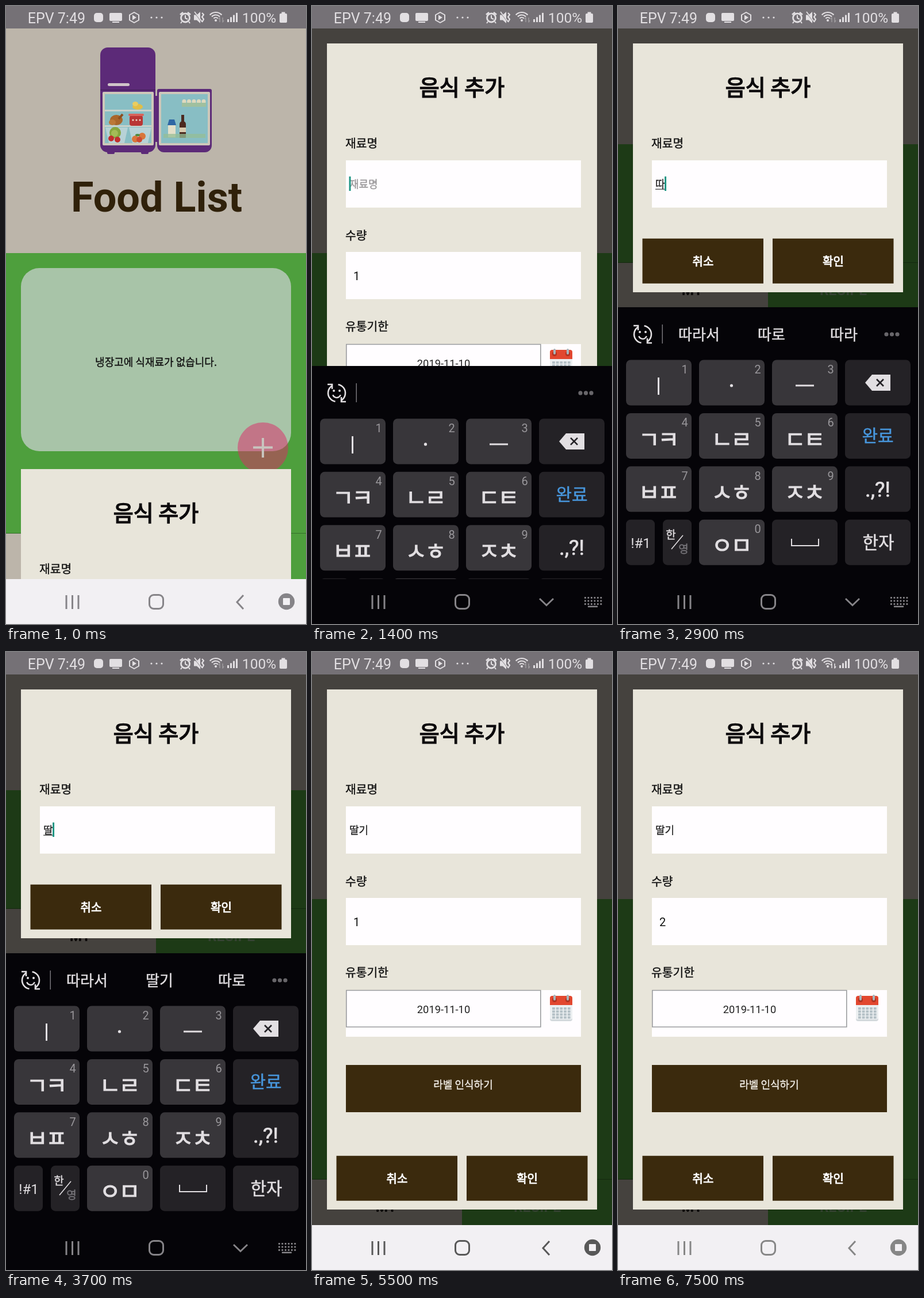
An HTML page with a canvas for the animation above (8000 ms loop, 522 by 1073 pixels).

```html
<!DOCTYPE html>
<html lang="ko">
<head>
<meta charset="utf-8">
<title>Food List</title>
<style>
html, body { margin: 0; width: 522px; height: 1073px; overflow: hidden; background: #757176; }
canvas { display: block; }
</style>
</head>
<body>
<canvas id="stage" width="522" height="1073"></canvas>
<script>
const ctx = document.getElementById('stage').getContext('2d');
const LOOP = 8000, STEP = 100;
const KOREAN = '"Noto Sans CJK KR", "Noto Sans CJK", sans-serif';
const LATIN = 'Roboto, "Noto Sans CJK KR", sans-serif';
const CREAM = '#e8e5da', BROWN = '#3b2a0d', PURPLE = '#5c2a78', ICE = '#88bec4', PALE = '#e2dfe2';
const MEDIUM = 0.042;

// Drawing helpers
function rect(x, y, w, h, color, r = 0) {
  ctx.fillStyle = color;
  ctx.beginPath();
  ctx.roundRect(x, y, w, h, r);
  ctx.fill();
}
function frame(x, y, w, h, color, width, r = 0) {
  ctx.strokeStyle = color;
  ctx.lineWidth = width;
  ctx.beginPath();
  ctx.roundRect(x, y, w, h, r);
  ctx.stroke();
}
function dot(x, y, r, color, ry = r) {
  ctx.fillStyle = color;
  ctx.beginPath();
  ctx.ellipse(x, y, r, ry, 0, 0, 7);
  ctx.fill();
}
function arc(x, y, r, from, to, color, width) {
  ctx.strokeStyle = color;
  ctx.lineWidth = width;
  ctx.beginPath();
  ctx.arc(x, y, r, from, to);
  ctx.stroke();
}
function path(points) {
  ctx.beginPath();
  for (let i = 0; i < points.length; i += 2) ctx.lineTo(points[i], points[i + 1]);
}
function line(points, color, width) {
  path(points);
  ctx.strokeStyle = color;
  ctx.lineWidth = width;
  ctx.stroke();
}
function shape(points, color) {
  path(points);
  ctx.fillStyle = color;
  ctx.fill();
}
// Text centred vertically on cy; Korean gets a thin outline (in em) for its heavier strokes
function text(s, x, cy, size, color, options = {}) {
  const { align = 'center', weight = 400, font = KOREAN, spacing = 0 } = options;
  const { outline = font == KOREAN ? 0.018 : 0 } = options;
  ctx.font = `${weight} ${size}px ${font}`;
  ctx.letterSpacing = spacing + 'px';
  ctx.textAlign = align;
  ctx.fillStyle = ctx.strokeStyle = color;
  ctx.lineWidth = size * outline;
  ctx.lineJoin = 'miter';
  ctx.fillText(s, x, cy + size * 0.365);
  if (outline) ctx.strokeText(s, x, cy + size * 0.365);
}
function clipped(x, y, w, h, draw) {
  ctx.save();
  ctx.beginPath();
  ctx.rect(x, y, w, h);
  ctx.clip();
  draw();
  ctx.restore();
}
const ramp = (t, from, to) => Math.min(1, Math.max(0, (t - from) / (to - from)));
const easeOut = p => 1 - (1 - p) ** 3;
const within = (t, from, to) => t >= from && t < to;
// Value of the last [time, value] entry already reached
const latest = (list, t) => list.reduce((v, e) => t >= e[0] ? e[1] : v, list[0][1]);

// Typing: [key down, column, row, resulting text]; the text follows 100 ms later
const taps = [
  [2000, 2, 1, 'ㄷ'], [2200, 2, 1, 'ㅌ'], [2400, 2, 1, 'ㄸ'], [2600, 0, 0, '띠'], [2800, 1, 0, '따'],
  [3000, 1, 1, '딴'], [3200, 1, 1, '딸'], [3800, 0, 1, '딹'], [4000, 0, 0, '딸기'],
];
const typed = [[0, ''], ...taps.map(tap => [tap[0] + 100, tap[3]])];
const suggestions = [
  [0, ''], [2200, '다 다른 다만'], [2600, '또 따라 때문에'], [2800, '따라서 따로 따라'],
  [3400, '따라서 딸기 따로'], [4200, '딸기는 딸기가 딸기를'],
];

function statusBar(t) {
  const latin = { font: LATIN };
  rect(0, 0, 522, 39, '#757176');
  text('EPV 7:49', 138, 20.5, 25, PALE, { ...latin, align: 'right' });
  rect(153, 12, 16, 16, PALE, 5);
  rect(180, 12, 22, 14, PALE, 2);
  rect(185, 27, 12, 2, PALE);
  ctx.lineJoin = 'round';
  line([223, 11, 231, 15.5, 231, 24.5, 223, 29, 215, 24.5, 215, 15.5, 223, 11, 231, 15.5], PALE, 2);
  shape([220, 15.5, 227, 20, 220, 24.5], PALE);
  for (const x of [253, 262, 271]) dot(x, 20, 1.6, PALE);

  arc(312, 20.5, 7.5, 0, 7, PALE, 2.8);
  line([312, 16, 312, 21, 316, 23], PALE, 2);
  line([303, 15, 308, 11], PALE, 2.8);
  line([316, 11, 321, 15], PALE, 2.8);
  line([306, 27, 304, 30], PALE, 2);
  line([318, 27, 320, 30], PALE, 2);
  shape([327, 15.5, 332, 15.5, 338, 10, 338, 30, 332, 24.5, 327, 24.5], PALE);
  line([327, 10, 341, 28], '#757176', 1.6);
  line([328, 10, 341, 27], PALE, 1.8);
  line([341, 12, 344, 15, 341, 19, 344, 23, 341, 28], PALE, 2.2);
  for (const r of [5, 9.5, 14]) arc(365, 25, r, -2.4, -0.74, PALE, 2.2);
  dot(365, 25, 2, PALE);
  const arrows = t >= 6800 ? PALE : '#9c999c';
  line([372, 28, 372, 20, 370, 23], arrows, 1.6);
  line([377, 20, 377, 28, 379, 25], arrows, 1.6);
  for (let i = 0; i < 4; i++) rect(385 + i * 5, 23 - i * 3.7, 3, 5 + i * 3.7, PALE);
  text('100%', 440.5, 20.5, 24.5, PALE, latin);
  rect(476, 13, 13, 16, PALE, 2);
  rect(479.5, 10.5, 6, 3, PALE);
}

function fridge() {
  for (const x of [176, 235]) rect(x, 248, 13, 9, PURPLE, 2);
  rect(164, 72, 96, 182, PURPLE, 13);
  rect(259, 156, 5, 80, PURPLE);
  rect(164, 145, 96, 1.5, '#47215e');
  rect(177, 134, 38, 5, '#cfc4c8', 2.5);
  rect(168, 149, 89, 93, '#cdc8ba', 2);
  rect(172, 153, 81, 85, ICE);
  for (const y of [180, 207]) rect(172, y, 81, 3, '#c9d2cb');
  dot(229, 175, 9, '#e0be48', 5);
  dot(225, 170, 5, '#e9cd60', 4);
  dot(192, 198, 11, '#a9662b', 9);
  dot(185, 202, 6, '#bb7838', 5);
  line([196, 196, 203, 188], '#8d4e20', 4);
  rect(215, 190, 23, 18, '#b93634', 4);
  rect(213, 187, 27, 4, '#d8645b', 2);
  for (const x of [221, 227, 233]) dot(x, 198, 1.6, '#eed9c9');
  for (const x of [173, 214]) shape([x, 211, x + 39, 211, x + 33, 238, x + 6, 238], '#b7d2d6');
  dot(190, 220, 10, '#86a63e');
  dot(189, 221, 6, '#a4bc56');
  dot(183, 230, 5, '#c22f2e');
  dot(194, 232, 5, '#c22f2e');
  dot(225, 231, 6, '#d8763a');
  dot(237, 226, 6, '#d8763a');
  dot(232, 232, 5, '#cd4b32');
  dot(229, 224, 4, '#4f8a3d', 2);

  rect(263, 144, 95, 110, PURPLE, [3, 3, 12, 12]);
  rect(266, 149, 89, 93, '#cdc8ba', 2);
  rect(270, 153, 81, 85, ICE);
  for (let i = 0; i < 5; i++) dot(310 + i * 8.5, 166, 3.6, '#dfd9bd', 4);
  rect(306, 168, 42, 7, '#a0c09f');
  rect(282, 206, 13, 22, '#e3dfc9');
  shape([284, 197, 293, 197, 296, 207, 281, 207], '#2f67a4');
  rect(302, 200, 11, 29, '#4c2a20', [5, 5, 1, 1]);
  rect(305, 189, 5, 14, '#4c2a20');
  rect(302, 211, 11, 8, '#d8cbb0');
  rect(274, 222, 73, 7, 'rgba(150,190,150,.75)');
}

function screen(compact) {
  const green = '#4e9f3d', beige = '#bcb5aa';
  const listTop = compact ? 240 : 429, tabTop = compact ? 445 : 915;
  rect(0, 39, 522, 956, beige);
  if (!compact) {
    fridge();
    text('Food List', 262, 331, 72, '#30210a', { weight: 700, font: LATIN });
  }
  rect(0, listTop, 522, tabTop - listTop, green);
  if (!compact) {
    rect(26, 455, 470, 318, '#a8c4a8', 32);
    text('냉장고에 식재료가 없습니다.', 261, 618, 18, '#111');
    dot(447, 767, 44, 'rgba(222,40,104,.5)');
    rect(430, 764.5, 34, 4, '#c8c4be');
    rect(445, 750, 4, 34, '#c8c4be');
  }
  rect(261, tabTop, 261, 80, green);
  rect(0, tabTop, 522, 1, '#35702a');
  const tab = { weight: 700, font: LATIN };
  text('MY', 129, tabTop + 48, 24.5, '#1a1410', tab);
  text('RECIPE', 392, tabTop + 48, 24.5, '#8fb587', tab);
}

function calendar() {
  rect(414, 599, 39, 42, '#d3d9dc', 4);
  rect(414, 599, 39, 39, '#eceff1', 3);
  rect(414, 597, 39, 16, '#e2472f', [4, 4, 0, 0]);
  for (const x of [420, 443]) {
    dot(x + 2, 604, 4, '#b03422');
    rect(x, 595, 4, 10, '#a9b4ba', 2);
  }
  for (let row = 0; row < 4; row++)
    for (let col = 0; col < 5; col++) rect(418 + col * 6.7, 617 + row * 5.2, 4.8, 4, '#b4c0c6');
}

function nameField(t) {
  const value = latest(typed, t);
  rect(59, 268, 409, 82, '#fffdff');
  if (value) text(value, 65, 309, 18, '#222', { align: 'left' });
  else text('재료명', 65, 309, 18, '#9a989a', { align: 'left' });
  const width = value ? ctx.measureText(value).width : 0;
  if (value && t < 5400) rect(65, 317.5, width, 1.2, '#333');
  const lastChange = Math.max(1300, latest(typed.map(e => [e[0], e[0]]), t));
  if (within(t, 1300, 5000) && (t - lastChange) % 1000 < 500) rect(65 + width - 0.5, 296, 3, 25, '#1f9684');
}

function dropdown(t) {
  ctx.save();
  ctx.globalAlpha = t < 6900 ? ramp(t, 5700, 6100) : 1 - ramp(t, 6900, 7300);
  ctx.shadowColor = 'rgba(0,0,0,.3)';
  ctx.shadowBlur = 16;
  rect(59, 427, 409, 305, '#fdfcfd', 4);
  ctx.shadowColor = 'transparent';
  if (t >= 6500) rect(59, 488, 409, 61, '#e3e1e3');
  for (let i = 0; i < 5; i++) text(i + 1, 72, 458 + i * 61, 20, '#111', { align: 'left', font: LATIN });
  ctx.restore();
}

function dialog(t, compact) {
  const bottom = compact ? 497 : 968, buttons = bottom - 93.3, left = { align: 'left' };
  rect(26, 65, 470, bottom - 65, CREAM);
  text('음식 추가', 261, 141, 38, '#0c0a0c', { outline: MEDIUM });
  text('재료명', 58, 238.5, 20.4, '#111', left);
  nameField(t);
  if (!compact) {
    text('수량', 58, 398.5, 20.4, '#111', left);
    rect(59, 427, 409, 82, '#fffdff');
    text(t < 6800 ? '1' : '2', 72, 469, 20, '#111', { ...left, font: LATIN });
    text('유통기한', 58, 557, 20.4, '#111', left);
    rect(59, 587, 409, 81, '#fffdff');
    frame(59.8, 587.5, 338, 63.5, '#9a9c9e', 1.6);
    text('2019-11-10', 229, 620, 18.3, '#222', { font: LATIN });
    calendar();
    rect(59, 717, 409, 82, BROWN);
    text('라벨 인식하기', 263, 751, 18, '#f4f0ea');
  }
  for (const [label, x] of [['취소', 42.5], ['확인', 269]]) {
    rect(x, buttons, 210.5, 78, BROWN);
    text(label, x + 105.5, buttons + 40, 20, '#fff', { outline: MEDIUM });
  }
  if (within(t, 5800, 7300)) dropdown(t);
}

function keyboard(t) {
  rect(0, 523, 522, 472, '#050408');
  arc(43, 570, 15, -1.4, 1, PALE, 2.6);
  arc(43, 570, 15, 1.74, 4.14, PALE, 2.6);
  line([27, 555, 35, 555, 35, 563], PALE, 2.6);
  line([59, 585, 51, 585, 51, 577], PALE, 2.6);
  arc(43, 571, 7, 0.3, 2.84, PALE, 2.4);
  for (const x of [38, 48]) dot(x, 566, 2, PALE);
  rect(76.5, 553, 1.5, 33, '#77757a');
  latest(suggestions, t).split(' ').forEach((word, i) => text(word, 141 + 126 * i, 571, 26, PALE));
  for (const x of [467, 476.5, 486]) dot(x, 570, 3.6, '#68666a');

  const labels = ['', '', '', 'ㄱㅋ', 'ㄴㄹ', 'ㄷㅌ', 'ㅂㅍ', 'ㅅㅎ', 'ㅈㅊ', '', 'ㅇㅁ', ''];
  const pressed = taps.find(tap => within(t, tap[0], tap[0] + 100));
  for (let row = 0; row < 4; row++) for (let col = 0; col < 4; col++) {
    const x = 14 + col * 127, y = 614.5 + row * 92.4, i = row * 3 + col;
    if (row == 3 && col == 0) {
      rect(14, y, 50, 79, '#242226', 8);
      rect(78, y, 50, 79, '#242226', 8);
      continue;
    }
    const plain = col == 3 || (row == 3 && col == 2);
    const down = pressed && pressed[1] == col && pressed[2] == row;
    rect(x, y, 114, 79, down ? '#5c5a5e' : plain ? '#242226' : '#38363a', 8);
    if (plain) continue;
    text((i + 1) % 11 == 0 ? '0' : i + 1, x + 102, y + 16, 20, '#99979b', { font: LATIN });
    text(labels[i], x + 55.5, y + 45, 40, PALE, { outline: 0.03, spacing: -3 });
  }
  rect(69, 645, 3, 30, PALE);
  dot(197.5, 659, 2.6, PALE);
  rect(309, 657.5, 32, 3, PALE);
  shape([430, 654, 442, 640, 474, 640, 474, 668, 442, 668], PALE);
  line([450, 648, 462, 660], '#242226', 2.6);
  line([462, 648, 450, 660], '#242226', 2.6);
  text('완료', 452, 746, 30, '#4796dc');
  text('.,?!', 452, 838, 37, PALE, { font: LATIN, outline: 0.02 });
  text('한자', 453, 931, 30, PALE);
  text('!#1', 39.5, 932, 24, PALE, { font: LATIN });
  text('한', 92, 918, 19, PALE);
  text('영', 114, 943, 19, '#77757a');
  line([93, 943, 113, 919], PALE, 1.6);
  line([302, 925, 302, 937, 349, 937, 349, 925], PALE, 2);
}

function navBar(t, dark) {
  rect(0, 995, 522, 78, dark ? '#050408' : '#f2f0f3');
  let color = '#868488';
  if (dark && t >= 4500) color = '#fff';
  else if (t >= 4500) {
    const v = 88 + 46 * ramp(t, 6900, 7500);
    color = `rgb(${v},${v},${v})`;
  }
  const ripple = easeOut(ramp(t, 4400, 4700));
  if (dark && ripple) rect(407.5 - 54.5 * ripple, 995, 109 * ripple, 78, '#363438', 39);
  for (const x of [105, 115.5, 126]) rect(x - 1.5, 1023, 3, 24, color);
  frame(249.5, 1022.5, 24, 24, color, 3, 7.5);
  if (dark) {
    line([396, 1029, 408, 1040.5, 420, 1029], color, 3);
    for (let i = 0; i < 6; i++) for (const y of [1026, 1031.5, 1037]) rect(474 + i * 5.5, y, 2.8, 2.8, color);
    rect(480, 1041.5, 17, 2.5, color);
  } else {
    line([413, 1023, 402, 1035, 413, 1047], color, 3);
    dot(488, 1034, 14.2, color);
    rect(482, 1028, 12, 12, '#f2f0f3', 1);
  }
}

function draw(t) {
  const compact = within(t, 1600, 4900);
  const dark = within(t, 1300, 5100);
  const slide = easeOut(ramp(t, 0, 400));
  screen(compact);
  rect(0, 39, 522, 956, `rgba(0,0,0,${0.63 * slide})`);
  clipped(0, 39, 522, 956, () => {
    ctx.translate(0, 739 * (1 - slide));
    dialog(t, compact);
  });
  if (compact) rect(0, 523, 522, 472, '#050408');
  if (dark) clipped(0, 523, 522, 472, () => {
    const hidden = t < 4800 ? 1 - easeOut(ramp(t, 1200, 1700)) : ramp(t, 4800, 5100) ** 2;
    ctx.translate(0, 472 * hidden);
    keyboard(t);
  });
  navBar(t, dark);
  statusBar(t);
}

// The picture advances ten times a second
function tick(now) {
  draw(Math.floor(now % LOOP / STEP) * STEP);
  requestAnimationFrame(tick);
}
requestAnimationFrame(tick);
</script>
</body>
</html>
```
